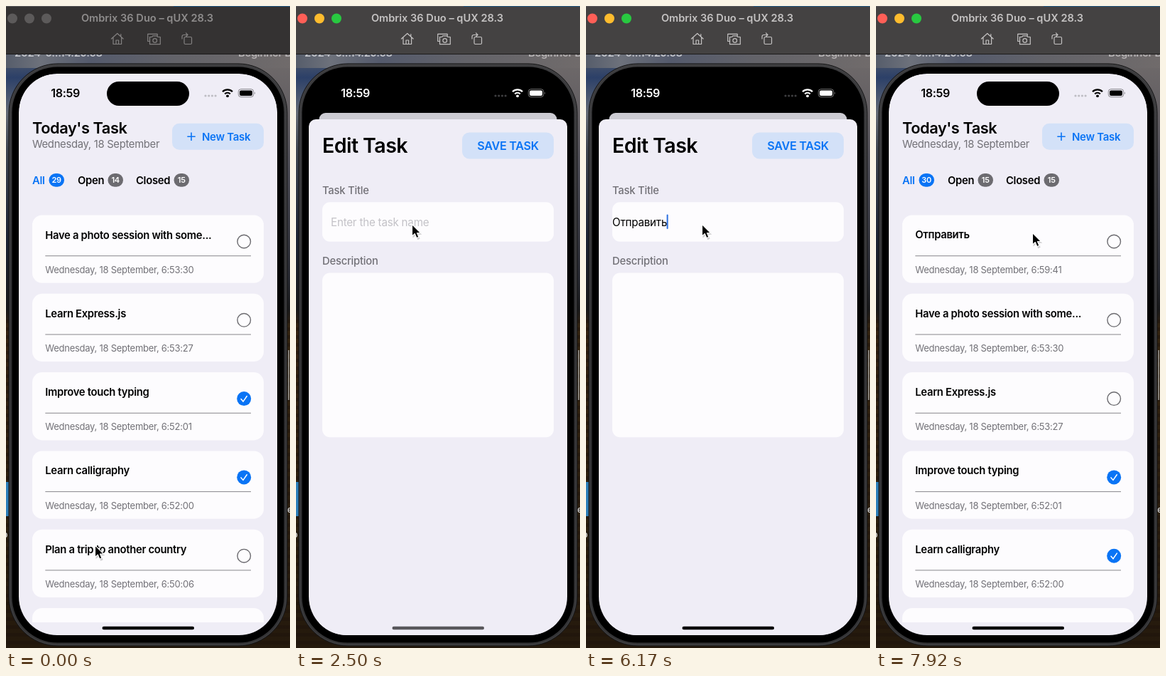
An HTML page for the animation above (8 s loop, 400 by 901 pixels).

```html
<!DOCTYPE html>
<html lang="en">
<head>
<meta charset="utf-8">
<title>Task list</title>
<style>
  html, body { margin: 0; width: 100%; height: 100%; overflow: hidden; background: #000; }
  svg { display: block; width: 400px; height: 901px; }
  text { font-family: Inter, Roboto, sans-serif; font-size: 14.8px; letter-spacing: -.02em; white-space: pre; }
  .semi { font-weight: 600; }
  .muted { fill: #727177; }
  .label { font-weight: 500; letter-spacing: -.016em; }
  .field { font-size: 15.2px; letter-spacing: -.015em; }
  .blue { fill: #0a74f5; }
  .mid { text-anchor: middle; }
</style>
</head>
<body>
<svg id="stage" viewBox="0 0 400 901" xmlns="http://www.w3.org/2000/svg"></svg>
<script>
const LOOP = 8000, PAPER = '#efedf6', CARD = '#fdfcfe', BLUE = '#0a74f5', GRAY = '#6c6b70';
const OPEN_AT = 690, SAVE_AT = 6990, FOCUS_AT = 2850, TYPE_AT = 3250, KEY_MS = 310;
const WORD = 'Отправить';

const text = (x, y, str, cls = '', extra = '') => `<text x="${x}" y="${y}" class="${cls}" ${extra}>${str}</text>`;
const rect = (x, y, w, h, r, fill, extra = '') =>
  `<rect x="${x}" y="${y}" width="${w}" height="${h}" rx="${r}" fill="${fill}" ${extra}/>`;
const gradient = (id, stops, dir = 'x2="0" y2="1"') => `<linearGradient id="${id}" ${dir}>` +
  stops.map(([at, color]) => `<stop offset="${at}" stop-color="${color}"/>`).join('') + '</linearGradient>';

function badge(x, id, fill) {
  return rect(x, 235, 21.5, 18.8, 9.4, fill) +
    text(x + 10.7, 248.4, '', 'semi mid', `id="${id}" fill="#fff" style="font-size:11px"`);
}

function task(i, [title, time, done]) {
  const y = 293.5 + 110.3 * i;
  const mark = done
    ? `<circle cx="335.2" cy="${y + 37}" r="10" fill="${BLUE}"/>
       <path d="M331 ${y + 37.5}l3 3.5 5.3-7.6" fill="none" stroke="#fff" stroke-width="1.5" stroke-linecap="round"/>`
    : `<circle cx="335.2" cy="${y + 37}" r="9.3" fill="none" stroke="${GRAY}" stroke-width="1.4"/>`;
  return rect(37, y, 326, 95.3, 14, CARD) + text(55.3, y + 33, title, 'semi') +
    rect(55.3, y + 56.7, 289.7, 1, 0, '#88878c') +
    text(55.3, y + 81.2, `Wednesday, 18 September, ${time}`, 'muted', 'style="font-size:13px"') + mark;
}

const oldTasks = [
  ['Have a photo session with some...', '6:53:30', 0],
  ['Learn Express.js', '6:53:27', 0],
  ['Improve touch typing', '6:52:01', 1],
  ['Learn calligraphy', '6:52:00', 1],
  ['Plan a trip to another country', '6:50:06', 0],
  ['', '6:50:05', 0]
];
const newTasks = [[WORD, '6:59:41', 0], ...oldTasks.slice(0, 5)];
const list = (id, tasks) => `<g id="${id}" clip-path="url(#listClip)">${tasks.map((t, i) => task(i, t)).join('')}</g>`;

const defs = `<defs>
  ${gradient('left', [[0, '#565d6b'], [.04, '#2c4068'], [.1, '#666b76'], [.16, '#414752'], [.31, '#1d2434'], [.43, '#18181a'], [.46, '#35220f'], [.8, '#2d200f'], [1, '#24190c']])}
  ${gradient('right', [[0, '#706b6b'], [.1, '#625e62'], [.2, '#484852'], [.38, '#25272f'], [.43, '#18181a'], [.46, '#33230f'], [1, '#251a0d']])}
  ${gradient('sky', [[0, '#565d6b'], [.12, '#6d717b'], [.3, '#545a6c'], [.6, '#636369'], [1, '#706b6b']], '')}
  ${gradient('bezel', [[0, '#3c3c3e'], [.5, '#2d2d2f'], [1, '#343436']])}
  <pattern id="rows" width="400" height="11" patternUnits="userSpaceOnUse">${rect(0, 0, 400, 5, 0, '#1d120a', 'opacity=".45"')}</pattern>
  <clipPath id="screen">${rect(18, 95, 364, 788, 54, '#000')}</clipPath>
  <clipPath id="listClip">${rect(18, 280, 364, 585, 0, '#000')}</clipPath>
  <clipPath id="desk">${rect(0, 67, 400, 834, 0, '#000')}</clipPath>
</defs>`;

const desktop = `<g clip-path="url(#desk)">
  ${rect(0, 67, 200, 834, 0, 'url(#left)')}${rect(200, 67, 200, 834, 0, 'url(#right)')}
  ${rect(0, 67, 400, 20, 0, 'url(#sky)')}${rect(0, 440, 400, 461, 0, 'url(#rows)')}
  ${rect(0, 668, 4, 48, 0, '#2c7fba')}${rect(397.4, 483, 1.4, 70, 0, '#a9a7a5')}
  ${text(12, 71, '2024-0...14.29.58', 'semi', 'fill="#c3c5cb"')}
  ${text(327, 71, 'Beginner B', 'semi', 'fill="#b5b2b3"')}
  ${text(-5, 746, 'p', 'semi', 'fill="#ccc" style="font-size:12px"')}
  ${text(396, 711, 'e', 'semi', 'fill="#ccc" style="font-size:12px"')}
</g>`;

const light = (x, color) => `<circle class="light" data-on="${color}" cx="${x}" cy="17.5" r="7"/>`;
const toolbar = `<rect id="bar" width="400" height="68"/>${rect(0, 67, 400, 1, 0, '#1c1b1b')}
  ${rect(0, 0, 400, 1, 0, '#5b5a5c')}${rect(236, 0, 164, 1, 0, '#255b83')}
  ${light(9, '#ff5f57')}${light(33, '#febc2e')}${light(57, '#28c840')}
  ${text(199, 22.3, 'Ombrix 36 Duo – qUX 28.3', 'semi mid', 'id="caption" style="font-size:14.6px;letter-spacing:0"')}
  <g id="icons" fill="none" stroke-width="1.2" stroke-linejoin="round" stroke-linecap="round">
    <path d="M148.5 46l8.3-7.5 8.3 7.5M151 44.5v9h11.6v-9M155 53.5v-5.5h3.6v5.5M161.8 42.5v-3"/>
    <path d="M202 49.5h-2.3V39.3h13.5v2.5"/>
    <path d="M202.5 43.5h3l1.3-1.7h5.6l1.3 1.7h3.6v10.2h-14.8z"/><circle cx="209.7" cy="48.4" r="2.8"/>
    <rect x="251" y="43.5" width="10.5" height="10" rx="1.5"/>
    <path d="M248 46v-3q0-2.5 2.5-2.5h5M253.5 38l2.5 2.5-2.5 2.5"/>
  </g>`;

const phone = `${rect(4, 81, 392, 817, 69, 'url(#bezel)', 'stroke="#141415" stroke-width="1"')}
  ${rect(5.5, 82.5, 389, 814, 67, 'none', 'stroke="#474749" stroke-width=".8"')}
  ${rect(8.5, 85.5, 383, 808, 64, '#000')}`;

const page = `<g id="page">
  <rect class="sheetBack" x="18" y="95" width="364" height="800" fill="${PAPER}"/>
  ${text(37, 178.7, "Today's Task", 'semi', 'style="font-size:21.8px"')}
  ${text(37, 199.2, 'Wednesday, 18 September', 'muted')}
  ${rect(234, 164.7, 129, 37, 10, '#d3e1f8')}
  <g id="newTask">
    ${text(276, 188.6, 'New Task', 'semi', 'style="font-size:15px"')}
    <path d="M255.3 182.4h4.9v-4.9h1.6v4.9h4.9v1.6h-4.9v4.9h-1.6v-4.9h-4.9z"/>
  </g>
  ${text(37, 249.6, 'All', 'semi blue')}${badge(60.5, 'countAll', BLUE)}
  ${text(101, 249.6, 'Open', 'semi')}${badge(143.5, 'countOpen', GRAY)}
  ${text(183, 249.6, 'Closed', 'semi')}${badge(236.5, 'countClosed', GRAY)}
  ${list('before', oldTasks)}${list('after', newTasks)}
  <rect id="dim" class="sheetBack" x="18" y="95" width="364" height="800"/>
</g>`;

const status = `${rect(142, 106, 116, 34, 17, '#000')}
  <g id="status">
    ${text(63.3, 128, '18:59', 'semi', 'style="font-size:16.1px"')}
    <circle cx="312" cy="126.3" r="1.9"/>
    <g class="outline" fill="none">
      <path d="M308.2 123.3a5.6 5.6 0 0 1 7.6 0M305 120.2a10 10 0 0 1 14 0" stroke-width="2.3"/>
      <rect x="327.3" y="116.7" width="21.4" height="11" rx="3.6" stroke-opacity=".45"/>
    </g>
    <rect x="329" y="118.4" width="18" height="7.6" rx="2.2"/>
    <path d="M350 120.5q1.8 1.7 0 3.4z" opacity=".5"/>
  </g>
  ${[0, 1, 2, 3].map(i => `<circle class="dot" cx="${281 + 4.7 * i}" cy="126" r="1.6"/>`).join('')}`;

const sheet = `<g id="sheet">
  ${rect(18, 159, 364, 800, 10, PAPER)}
  ${text(37, 205.8, 'Edit Task', 'semi', 'style="font-size:28.6px"')}
  ${rect(234, 177.5, 129, 37, 10, '#d3e1f8')}
  ${text(298.5, 201.7, 'SAVE TASK', 'semi blue mid', 'style="font-size:16.2px"')}
  ${text(37, 264, 'Task Title', 'muted label')}${rect(37, 275.3, 326, 55.4, 11, CARD)}
  <rect id="mark" x="35.5" y="291" height="22" fill="#bccde3"/>
  ${text(49, 308.8, 'Enter the task name', 'field', 'id="hint" fill="#c3c2c7"')}
  ${text(37, 308.8, '', 'field', 'id="typed"')}
  <rect id="caret" y="292.5" width="2" height="20.5" rx="1" fill="#2b6fe0"/>
  ${text(37, 363, 'Description', 'muted label')}${rect(37, 374.5, 326, 230.7, 11, CARD)}
</g>`;

const cursor = `<g id="cursor">
  <path d="M1 2v17l4-3.5 2.8 6.3 3.4-1.5-2.7-6h5.3z" fill="#000" opacity=".18"/>
  <path d="M0 0v16.5l3.8-3.5 2.6 6.1 3-1.3-2.5-5.8h5.1z" fill="#000" stroke="#fff" stroke-width="1.1" stroke-linejoin="round"/>
</g>`;

document.getElementById('stage').innerHTML = defs + desktop + toolbar + phone +
  `<g clip-path="url(#screen)">${page}${sheet}${status}${rect(135.5, 870.7, 129.5, 4.6, 2.3, '#000', 'id="home"')}</g>` + cursor;

const $ = id => document.getElementById(id);
const setAll = (sel, name, value) => document.querySelectorAll(sel).forEach(el => el.setAttribute(name, value));
const show = (id, on) => { $(id).style.display = on ? '' : 'none'; };
const clamp = v => Math.max(0, Math.min(1, v));
const ramp = (t, from, to) => clamp((t - from) / (to - from));
const mix = (a, b, k) => a + (b - a) * k;
const rgb = (a, b, k) => `rgb(${a.map((v, i) => Math.round(mix(v, b[i], k)))})`;
const spring = ms => ms <= 0 ? 0 : 1 - (1 + .013 * ms) * Math.exp(-.013 * ms);

// [time, x, y] of the pointer tip
const pointer = [
  [0, 125.5, 757], [480, 264, 190], [800, 263, 190], [1000, 254.5, 217],
  [1650, 163.5, 306.5], [6250, 163.5, 306.5], [6720, 288, 198],
  [7200, 286, 196], [7330, 283, 197], [7800, 220.5, 318.5], [LOOP, 220.5, 318.5]
];

function pointerAt(t) {
  const i = Math.max(1, pointer.findIndex(p => p[0] > t));
  const [t0, x0, y0] = pointer[i - 1], [t1, x1, y1] = pointer[i];
  const u = ramp(t, t0, t1), k = u * u * (3 - 2 * u);
  return [mix(x0, x1, k), mix(y0, y1, k)];
}

function render(t) {
  const active = t >= 560, saved = t >= SAVE_AT;
  $('bar').setAttribute('fill', active ? '#444242' : '#343232');
  document.querySelectorAll('.light').forEach(el => el.setAttribute('fill', active ? el.dataset.on : '#5c5a5a'));
  $('caption').setAttribute('fill', active ? '#c4c2c2' : '#8e8c8c');
  $('icons').setAttribute('stroke', active ? '#c4c2c2' : '#838181');

  const up = saved ? 1 - spring(t - SAVE_AT) : spring(t - OPEN_AT);
  $('page').setAttribute('transform', `translate(200 ${95 + 55 * up}) scale(${1 - .08 * up}) translate(-200 -95)`);
  setAll('.sheetBack', 'rx', mix(54, 10, up));
  $('dim').setAttribute('opacity', .145 * up);
  $('sheet').setAttribute('transform', `translate(0 ${724 * (1 - up)})`);
  $('newTask').setAttribute('fill', rgb([10, 116, 245], [165, 175, 192], saved ? up : ramp(t, OPEN_AT, 930)));

  const pale = saved ? 1 - ramp(t, 7100, 7430) : ramp(t, 810, 1160);
  const tone = rgb([0, 0, 0], [255, 255, 255], pale);
  $('status').setAttribute('fill', tone);
  setAll('.outline', 'stroke', tone);
  setAll('.dot', 'fill', rgb([190, 189, 195], [62, 62, 64], up));
  const gray = ramp(t, 750, 950) * (1 - ramp(t, FOCUS_AT, FOCUS_AT + 200));
  $('home').setAttribute('fill', rgb([0, 0, 0], [88, 87, 91], gray));

  show('before', !saved);
  show('after', saved);
  $('countAll').textContent = saved ? 30 : 29;
  $('countOpen').textContent = saved ? 15 : 14;
  $('countClosed').textContent = 15;

  const typedCount = Math.max(0, Math.min(WORD.length, Math.floor((t - TYPE_AT) / KEY_MS)));
  $('typed').textContent = WORD.slice(0, typedCount);
  const width = typedCount ? $('typed').getComputedTextLength() : 0;
  show('hint', !typedCount);
  show('mark', typedCount > 0 && typedCount < 7);
  $('mark').setAttribute('width', width + 2.5);
  show('caret', t >= FOCUS_AT && t < SAVE_AT);
  $('caret').setAttribute('x', 36.5 + width);

  $('cursor').setAttribute('transform', `translate(${pointerAt(t)})`);
}

const start = performance.now();
function tick() {
  render((performance.now() - start) % LOOP);
  requestAnimationFrame(tick);
}
tick();
</script>
</body>
</html>
```
